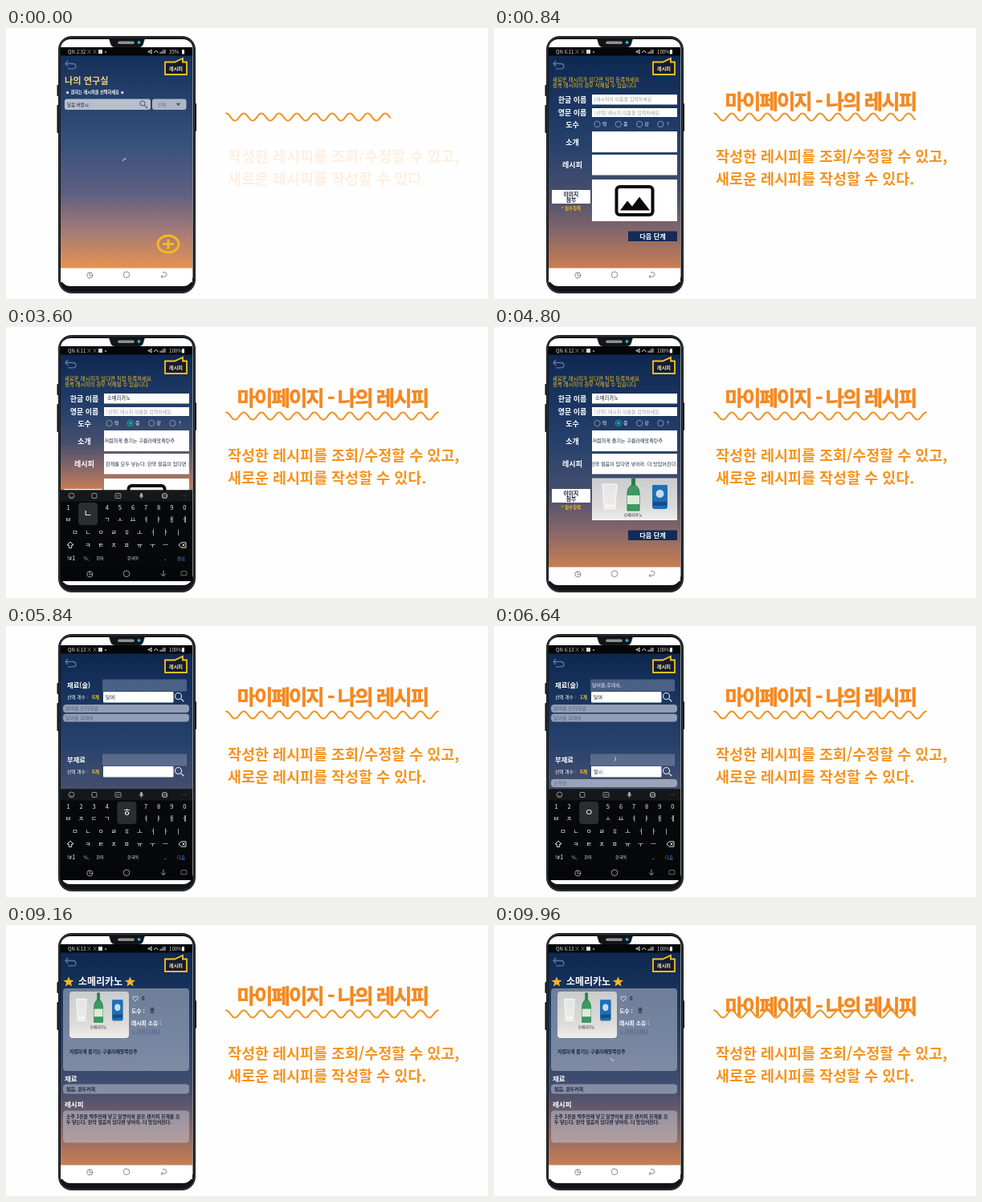
Write an HTML page that moves like this. It is 600x338 px and loops after 10000 ms.

```html
<!DOCTYPE html>
<html lang="ko">
<head>
<meta charset="utf-8">
<title>나의 레시피</title>
<style>
  html, body { margin: 0; width: 100%; height: 100%; overflow: hidden; background: #fffeff; }
  svg { display: block; width: 100vw; height: 100vh; }
  text { font-family: "Noto Sans CJK KR", "Noto Sans CJK", "Noto Sans CJK JP", sans-serif; white-space: pre; }
</style>
</head>
<body>
<svg viewBox="0 0 600 338">
  <defs>
    <linearGradient id="dusk" x1="0" y1="0" x2="0" y2="1">
      <stop offset="0" stop-color="#14305a"/><stop offset=".4" stop-color="#35507d"/>
      <stop offset=".65" stop-color="#5f5f80"/><stop offset=".82" stop-color="#a27a7a"/>
      <stop offset="1" stop-color="#e5934f"/>
    </linearGradient>
    <linearGradient id="night" x1="0" y1="0" x2="0" y2="1">
      <stop offset="0" stop-color="#0d2850"/><stop offset=".4" stop-color="#24406b"/>
      <stop offset=".65" stop-color="#474f6e"/><stop offset=".82" stop-color="#84656a"/>
      <stop offset="1" stop-color="#c97f52"/>
    </linearGradient>
    <linearGradient id="table" x1="0" y1="0" x2="0" y2="1">
      <stop offset="0" stop-color="#c9ccce"/><stop offset=".7" stop-color="#dedcd8"/>
      <stop offset="1" stop-color="#f0eeea"/>
    </linearGradient>
    <clipPath id="recipeBox"><rect x="122" y="158" width="106" height="26"/></clipPath>
    <clipPath id="aboveWave"><path id="waveMask"/></clipPath>
  </defs>
  <g id="phone"></g>
  <g id="app"></g>
  <g id="caption">
    <g clip-path="url(#aboveWave)"><g id="title"></g></g>
    <path id="wave" fill="none" stroke="#f0921f" stroke-width="2" stroke-linecap="round"/>
    <g id="body"></g>
  </g>
</svg>
<script>
const LOOP = 10000;
const $ = id => document.getElementById(id);
const BOLD = ' font-weight="700"', BLACK = ' font-weight="900"', MID = ' text-anchor="middle"';
const YELLOW = '#f8c21c', INK = '#1b2238', TEAL = '#17b3ad';

// y is the vertical centre of the glyphs
const text = (x, y, s, size, fill = '#fff', extra = '') =>
  `<text x="${x}" y="${y + size * .37}" font-size="${size}" fill="${fill}"${extra}>${s}</text>`;
const rect = (x, y, w, h, fill, r = 0, extra = '') =>
  `<rect x="${x}" y="${y}" width="${w}" height="${h}" rx="${r}" fill="${fill}"${extra}/>`;
const line = (d, color, w = 1, fill = 'none') =>
  `<path d="${d}" fill="${fill}" stroke="${color}" stroke-width="${w}"/>`;
const ring = (x, y, r, color, w = 1, fill = 'none') =>
  `<circle cx="${x}" cy="${y}" r="${r}" fill="${fill}" stroke="${color}" stroke-width="${w}"/>`;
const caret = `<tspan fill="${TEAL}">|</tspan>`;
const backdrop = (paint, height = 266) => rect(68, 34, 164, height, `url(#${paint})`);

const typed = (s, t, start, step) => s.slice(0, Math.max(0, Math.floor((t - start) / step) + 1));
const latest = (table, t) => table.reduce((v, [at, next]) => t >= at ? next : v, '');
const clamp = v => Math.min(1, Math.max(0, v));

const phone = () =>
  rect(63.5, 71, 4, 14, '#111', 1) + rect(63.5, 96, 4, 35, '#111', 1) + rect(234, 94, 3, 35, '#111', 1) +
  rect(65, 10, 171, 321, '#111316', 17) +
  rect(66.2, 11.2, 168.6, 318.6, 'none', 16, ' stroke="#45484d" stroke-width=".9"') +
  rect(68, 14, 164.5, 308, '#fff', 12) +
  line('M127 12 H174 Q172 14 171 19 Q170 24 165 24 H136 Q131 24 130 19 Q129 14 127 12Z', '#333', .5, '#111316') +
  rect(139, 16.5, 21, 3.5, '#8d9094', 2) + ring(165.5, 18, 1.9, '#0d5f78', 1, '#35c4e8');

function statusBar(clock, charge) {
  return rect(68, 24, 164, 10.5, '#050608') +
    text(77, 29.5, `QN ${clock}`, 6.1, '#ddd') +
    line('M101.5 27l4 5m0-5l-4 5M108.5 27l4 5m0-5l-4 5', '#aaa', .6) +
    rect(115, 27, 5, 5, '#ddd', .5) + ring(124, 30, .5, '#ddd') +
    line('M177 29h2l2-2v5l-2-2h-2zM184 31q3-5 5 0M192 32v-2m2 2v-3m2 3v-5m2 5v-5', '#ddd', 1) +
    text(203, 29.5, charge, 6.1, '#ddd') + rect(219, 27, 3, 5.5, '#eee', .5);
}

function navBar(dark) {
  const c = dark ? '#999' : '#888';
  const icons = line('M104 306a3.6 3.6 0 1 0 4 4h-4zM104 306q4 0 4 4', c, 1) + ring(150, 309, 3.8, c) +
    (dark ? line('M196 305v7m-3-3l3 3l3-3', c) + rect(218, 306, 7, 5, 'none', .5, ` stroke="${c}" stroke-width=".7"`)
          : line('M195 306h2q3 0 3 2.7t-3 2.7h-4m2-2l-2 2l2 2', c));
  return rect(68, 299.5, 164, 17.5, dark ? '#050608' : '#fff') + `<g transform="translate(0 -1.3)">${icons}</g>`;
}

const header = () =>
  line('M77 41l-3 3.5l3 3.5M74 44.5h9q4 0 4 3.2t-4 3.2h-6', '#64759a', 1.3) +
  line('M198 42.5H210L220 38V42.5H225V58H198Z', YELLOW, 1.8, '#141c33') +
  text(211.5, 50.5, '레시피', 6.2, '#ffe6a0', BOLD + MID);

const magnifier = (x, y, r, color) =>
  ring(x - 1, y - 1, r, color, 1.1) + line(`M${x + r * .6} ${y + r * .6}l3.4 3.4`, color, 1.3);

const spinner = t => `<g transform="rotate(${t * .36} 148.5 166)">` +
  line('M145.5 166a3 3 0 0 0 4 2.8', '#e7eaf2', .9) + '</g>';

function listPage(t) {
  const search = t < 400 ? typed('달콤 버블시', t, -400, 80) + caret : '';
  return backdrop('dusk') + header() +
    text(73, 66, '나의 연구실', 11.2, '#f7cf74', BLACK) +
    text(74, 80.5, '★ 원하는 레시피를 선택하세요 ★', 5.2, '#fff', BOLD) +
    rect(73, 88.5, 107, 13.5, '#b9c0cd', 3) + text(76, 95.5, search, 5.5, INK) + magnifier(171, 95, 3, '#5a6478') +
    rect(182, 88.5, 42.5, 13.5, '#aeb6c5', 3) + text(189, 95.5, '전체', 5.5, '#6a7488') +
    line('M212 94h5l-2.5 3z', '#4c566c', .5, '#4c566c') + spinner(t + 300) +
    '<ellipse cx="202" cy="269.5" rx="13" ry="10.5" fill="none" stroke="#f5b81c" stroke-width="3"/>' +
    line('M195 269.5h14M202 263.5v12', '#f5b81c', 3);
}

const drinks = () =>
  line('M13 6h18l-2.5 31h-13z', '#f7f9fa', 1.2, '#ffffff77') + line('M16 33h12', '#f5f7f8', 3) +
  rect(49, -3, 5, 12, '#2d7a4c', 1) + line('M49 7q-5 4-5 10v22h15V17q0-6-5-10z', '#2a7a4b', 1, '#3b9b62') +
  rect(44, 20, 15, 11, '#dcebdc') +
  rect(75, 6, 19, 31, '#1f6fb5', 3) + rect(76, 5, 17, 2, '#c7ced6') + rect(76, 28, 17, 5, '#174c86') +
  `<circle cx="84.5" cy="18" r="5" fill="#c6dcec"/>`;

const photo = () => rect(122, 188.5, 106, 52, 'url(#table)') +
  `<g transform="translate(122 190)">${drinks()}</g>` + text(173, 234, '소메리카노', 5, INK, MID);

const RECIPE = '소주 1잔을 맥주잔에 넣고 달콩이와 같은 캔커피 한개를 모두 넣는다. 만약 얼음이 있다면 넣어라. 더 맛있어진다.';
const INTRO = '저렴하게 즐기는 구름라떼맛폭탄주';

function formPage(t, typing) {
  const name = typed('소메리카노', t, 920, 40), recipe = typed(RECIPE, t, 1620, 40);
  const label = (y, s) => text(97.5, y, s, 9, '#fff', BOLD + MID);
  const long = recipe.length > 22;
  const writing = typing && t > 1620;
  // the backdrop shrinks to the room left above the keyboard
  let s = backdrop('night', typing ? 170 : 266) + header() +
    text(73, 64.5, '새로운 레시피가 있다면 직접 등록하세요.', 6.45, YELLOW) +
    text(73, 72, '중복 레시피의 경우 삭제될 수 있습니다.', 6.45, YELLOW) +
    label(89.5, '한글 이름') + label(105.5, '영문 이름') + label(120.5, '도수') + label(142.5, '소개') + label(171, '레시피') +
    rect(122, 83, 106, 12.5, '#fff') + rect(122, 100, 106, 11, '#fff') +
    rect(122, 129, 106, 26, '#fff') + rect(122, 158, 106, 25.5, '#fff') +
    (name ? text(126, 89, name, 6.3, INK)
          : text(125, 89, caret + '레시피의 이름을 입력하세요.', 6, '#999')) +
    text(125, 105.5, '[선택] 레시피 이름을 입력하세요.', 6, '#999') +
    text(122.5, 142, typed(INTRO, t, 1140, 25), 6.1, INK) +
    `<g clip-path="url(#recipeBox)">${text(long ? 228 : 123, 171, recipe + (writing ? caret : ''), 6.15, INK,
      long ? ' text-anchor="end"' : '')}</g>`;
  ['약', '중', '강', '?'].forEach((c, i) => {
    const x = 128.5 + i * 26.3, on = i === 1 && t > 1130;
    s += ring(x, 120, 3.7, on ? TEAL : '#8f9bb5', .9) + text(x + 9, 120, c, 6, '#fff', MID);
    if (on) s += ring(x, 120, 1.6, TEAL, .6, TEAL);
  });
  s += rect(72, 202, 48, 17, '#fff', 1) + text(96, 207, '이미지', 6.8, INK, BOLD + MID) +
    text(96, 214.5, '첨부', 6.8, INK, BOLD + MID) + text(96, 224.5, '* 필수항목', 5.5, YELLOW, BOLD + MID) +
    rect(122, 189, 106, 52, '#fff') +
    rect(152.5, 198, 45, 35, '#fff', 4, ' stroke="#0a0a0a" stroke-width="4"') +
    '<path d="M157 227.5l9-12l6 7l9-12l13 17z" fill="#0a0a0a"/>';
  if (t >= 4640) s += `<g opacity="${clamp((t - 4600) / 200)}">${photo()}</g>`;
  return s + rect(167, 253.5, 61, 12.5, '#132b57') + text(197.5, 259.5, '다음 단계', 8.2, '#fff', BOLD + MID);
}

function ingredientSection(y, title, count, chosen, query, rows) {
  return text(76, y, title, 8.3, '#fff', BOLD) +
    rect(120, y - 7, 105, 15, '#8b9ab8', 1, ' opacity=".45"') + text(122, y, chosen, 6, '#e9edf5') +
    text(76, y + 15.5, '선택 개수 :', 5.8, '#fff') + text(107, y + 15.5, count, 6, YELLOW, BOLD) +
    rect(121, y + 8.5, 87.5, 13.5, '#fff', 1) + text(124, y + 15.5, query, 6, INK) +
    magnifier(215.5, y + 15, 4, '#e4e8f0') +
    rows.map((r, i) => rect(71, y + 24.5 + i * 11.5, 157, 10, '#b8c0d0', 4, ' opacity=".75"') +
      text(74, y + 29.5 + i * 11.5, r, 6, '#59637a')).join('');
}

const SIDE_QUERY = [[6520, 'ㅇ'], [6580, '얼'], [6630, '얼ㅇ'], [6680, '얼음'], [7040, ''], [7120, 'ㅋ'], [7200, '커'], [7300, '커피']];
const SIDE_ROW = [[6600, '소주잔'], [6760, '얼음'], [7040, ''], [7400, '원두커피']];
const SIDE_CHOSEN = [[6960, '얼음,'], [8000, '얼음, 원두커피,']];
const SIDE_COUNT = [[0, '0개'], [6960, '1개'], [8000, '2개']];

function ingredientsPage(t) {
  const row = latest(SIDE_ROW, t), picked = t >= 6080;
  return backdrop('night') + header() +
    ingredientSection(73.5, '재료(술)', picked ? '1개' : '0개', picked ? '달여울,후레쉬,' : '',
      typed('달여', t, 5560, 120) + (t < 6320 ? caret : ''), t >= 5840 ? ['달여울 오리지널', '달여울 후레쉬'] : []) +
    ingredientSection(166.5, '부재료', latest(SIDE_COUNT, t), latest(SIDE_CHOSEN, t),
      latest(SIDE_QUERY, t) + (t >= 6320 ? caret : ''), row ? [row] : []) +
    (t > 6600 && t < 6760 || t > 5780 && t < 5840 ? spinner(t) : '') +
    rect(71, 250, 138, 8, '#f2f3f6') +
    text(71.5, 254, '등록되지 않은 재료가 있으면 아래에 꼭 체크해 주세요.', 5.9, '#17305c') +
    text(71.5, 265, '레시피 참고 필요', 6.8, '#fff', BOLD) +
    rect(125.5, 262, 6, 6, t >= 8200 ? '#118a8c' : 'none', 1, ` stroke="${TEAL}"`) +
    (t >= 8200 ? line('M127 265l1.3 1.5l2.4-3', '#0e3550', .9) : '') +
    rect(166, 276.5, 62, 12, '#546c93', 2) + text(197, 282.5, '작성 완료', 8, '#fff', BOLD + MID);
}

const star = x => `<path transform="translate(${x} 71)" fill="#f9b529" d="M0-6.5L1.8-2.2L6.5-2L2.9 1L4.1 5.5L0 3L-4.1 5.5L-2.9 1L-6.5-2L-1.8-2.2Z"/>`;

function resultPage(t) {
  const panel = (y, h) => rect(71, y, 157, h, '#c5cbd8', 4, ' opacity=".5"');
  const dark = (x, y, s) => text(x, y, s, 5.9, INK, BOLD);
  return backdrop('night') + header() + star(78) + star(154.5) +
    text(117.5, 71, '소메리카노', 12, '#fff', BLACK + MID) + panel(79, 103) +
    rect(79, 83, 74, 58, 'url(#table)', 4) +
    `<g transform="translate(78 87) scale(.72 .88)">${drinks()}</g>` + text(115, 127, '소메리카노', 4.5, INK, MID) +
    line('M161 95l-3-3q-1-3 1.3-3.3q1.4 0 1.7 1.5q.3-1.5 1.7-1.5q2.3.3 1.3 3.3z', '#e3e6ee', .8) +
    dark(169, 92, '0') + text(156, 107, '도수 :', 6.8, '#fff', BOLD) + text(179, 107, '중', 6.5, INK, BOLD) +
    text(156, 122, '레시피 소유 :', 6.8, '#fff', BOLD) + text(156, 134, '느긋한고래님', 6.5, '#5b6a8a', BOLD) +
    dark(79, 158, INTRO) + (t < 9800 ? '' : spinner(t - 9960)) +
    text(73, 191.5, '재료', 8.5, '#fff', BOLD) + panel(198.5, 12) + dark(75, 204.5, '얼음, 원두커피') +
    text(73, 224, '레시피', 8.5, '#fff', BOLD) + panel(231.5, 40) +
    dark(75, 239, RECIPE.slice(0, 32)) + dark(75, 246, RECIPE.slice(32).trim());
}

const KEY_ROWS = ['1234567890', 'ㅂㅈㄷㄱㅅㅛㅕㅑㅐㅔ', 'ㅁㄴㅇㄹㅎㅗㅓㅏㅣ', 'ㅋㅌㅊㅍㅠㅜㅡ'];
const POPUPS = [2, 6, 4, 7, 1, 5];

function keyboard(t, action) {
  let s = rect(68, 203.5, 164, 97, '#07080a') + rect(68, 203.5, 164, 14, '#15171a');
  const grey = '#aeb2b8';
  s += ring(81.5, 210.5, 3.4, grey, .8) + line('M79.7 211.5q1.8 2 3.6 0', grey, .7) +
    rect(107, 207.5, 6, 6, 'none', 1, ` stroke="${grey}" stroke-width=".8"`) +
    rect(136, 207.5, 7, 6, 'none', 1, ` stroke="${grey}" stroke-width=".8"`) + text(139.5, 210.5, 'GIF', 3, grey, MID) +
    rect(167, 207, 3, 5, grey, 1.5) + line('M165.5 210q3 5 6 0M168.5 212.5v2', grey, .7) +
    ring(197.5, 210.5, 3, grey, 1.2) + ring(197.5, 210.5, .8, grey, .7) + text(222, 210, '…', 7, grey, MID);
  KEY_ROWS.forEach((keys, r) => {
    const x0 = [77.5, 77.5, 86, 102][r], y = [225.5, 240, 256.5, 272.5][r];
    [...keys].forEach((k, i) => s += text(x0 + i * 16.1, y, k, r ? 8 : 7.5, '#f1f1f1', MID));
  });
  s += line('M80 268l-4 4h2.3v3.5h3.4V272h2.3z', '#eee', .9) +
    line('M215 272l3-3.2h6v6.4h-6zM219.5 270.5l3 3m0-3l-3 3', '#eee', .9) +
    text(81, 288.5, '!#1', 7, '#eee', MID) + text(100, 288.5, '%,', 6, '#aaa', MID) +
    text(117, 288.5, '한자', 5, '#eee', MID) + text(158, 288.5, '한국어', 5, '#eee', MID) +
    text(198, 288, '.', 8, '#eee', MID) + text(218, 288.5, action, 5.5, '#4f8df0', MID);
  const i = POPUPS[Math.floor((t - 2300) / 80 + 600) % POPUPS.length];
  const x = 86 + i * 16.1;
  return s + rect(x - 12, 219, 24, 28, '#2b2d31', 4) + text(x, 233, KEY_ROWS[2][i], 12, '#fff', MID);
}

function app(t) {
  const inForm = t >= 400 && t < 5320;
  const typing = t >= 920 && t < 4120 || t >= 5440 && t < 7640;
  const listing = t < 400 || t >= 8640 && t < 9080;
  const page = listing ? listPage : inForm ? formPage : t < 8640 ? ingredientsPage : resultPage;
  const clock = t < 400 ? '2:32' : t < 4640 ? '6:11' : t < 5320 ? '6:12' : '6:13';
  return page(t, typing) + (typing ? keyboard(t, inForm ? '완료' : '다음') : '') +
    statusBar(clock, t < 400 ? '35%' : '100%') + navBar(typing);
}

function wavePath(end) {
  let d = '';
  for (let x = 274; x <= end; x++)
    d += `${d ? 'L' : 'M'}${x} ${(111 - 4.6 * Math.cos((x - 274) / 22 * 2 * Math.PI)).toFixed(2)}`;
  return d;
}

// the line grows while the title rises from behind it; both retreat at the end
function caption(t) {
  const speed = 46 / 840, settled = 60 / speed, leaving = Math.max(0, t - 9704);
  $('wave').setAttribute('d', wavePath(Math.min(538, 478 + t * speed) - leaving * speed));
  const drop = 42 * (1 - clamp(t / settled)) ** 2 + 13 * leaving / 256;
  $('title').setAttribute('transform', `translate(0 ${drop})`);
  $('body').setAttribute('opacity', clamp(.13 + t / 800));
}

$('phone').innerHTML = phone();
$('waveMask').setAttribute('d', wavePath(538) + 'V60H274Z');
$('title').innerHTML = text(287.5, 89, '마이페이지 - 나의 레시피', 25.4, '#f5881f',
  BLACK + ' letter-spacing="-1.9" stroke="#f5881f" stroke-width=".6"');
$('body').innerHTML = text(276, 160.5, '작성한 레시피를 조회/수정할 수 있고,', 18.45, '#f7931e', BOLD) +
  text(276, 188.5, '새로운 레시피를 작성할 수 있다.', 18.45, '#f7931e', BOLD);

const start = performance.now();
function tick() {
  const t = (performance.now() - start) % LOOP;
  $('app').innerHTML = app(t);
  caption(t);
  requestAnimationFrame(tick);
}
tick();
</script>
</body>
</html>
```
